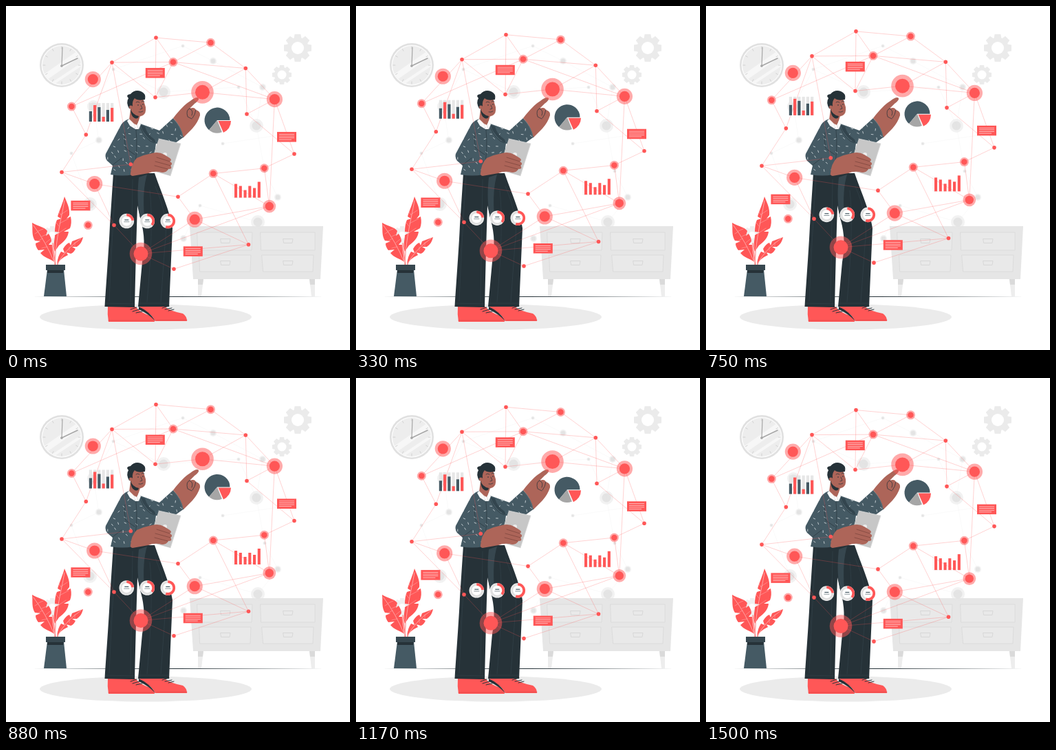
An HTML page with a canvas that plays this animation: 500 by 500 pixels, repeating every 1540 ms.

```html
<!DOCTYPE html>
<html lang="en">
<head>
<meta charset="utf-8">
<title>Data network</title>
<style>
html, body { margin: 0; width: 100%; height: 100%; overflow: hidden; background: #fff; }
canvas { display: block; width: 100vw; height: 100vh; }
</style>
</head>
<body>
<canvas id="stage" width="500" height="500"></canvas>
<script>
const RED = '#ff5757', DARK = '#263238', SLATE = '#455a64', SKIN = '#ad6559', PALE = '#ebebeb';
const TAU = Math.PI * 2, DEG = Math.PI / 180;
const LOOP = 1540, STEPS = 37;

const stage = document.getElementById('stage').getContext('2d');
const backdrop = document.createElement('canvas');
backdrop.width = backdrop.height = 500;
let ctx = backdrop.getContext('2d');

function fill(d, color) {
  ctx.fillStyle = color;
  ctx.fill(new Path2D(d));
}

function stroke(d, color, width = 0.6) {
  ctx.strokeStyle = color;
  ctx.lineWidth = width;
  ctx.stroke(new Path2D(d));
}

function disc(x, y, r, color, alpha = 1) {
  ctx.globalAlpha = alpha;
  ctx.fillStyle = color;
  ctx.beginPath();
  ctx.arc(x, y, r, 0, TAU);
  ctx.fill();
  ctx.globalAlpha = 1;
}

function rect(x, y, w, h, color) {
  ctx.fillStyle = color;
  ctx.fillRect(x, y, w, h);
}

function wedge(x, y, r, from, to, color) {
  ctx.fillStyle = color;
  ctx.beginPath();
  ctx.moveTo(x, y);
  ctx.arc(x, y, r, from * DEG, to * DEG);
  ctx.fill();
}

function gear(x, y, r, hole, color = PALE) {
  ctx.save();
  ctx.translate(x, y);
  disc(0, 0, r * 0.78, color);
  for (let i = 0; i < 8; i++) {
    ctx.rotate(TAU / 8);
    fill(`M${-r * .27} ${-r * .7}L${-r * .22} ${-r}H${r * .22}L${r * .27} ${-r * .7}Z`, color);
  }
  disc(0, 0, hole, '#fff');
  ctx.restore();
}

function drawClock() {
  disc(81, 86, 32, '#e0e0e0');
  disc(81, 86, 29.5, '#fafafa');
  disc(81, 86, 28, '#ededed');
  ctx.save();
  ctx.beginPath();
  ctx.arc(81, 86, 28, 0, TAU);
  ctx.clip();
  stroke('M52 107L108 68', '#f7f7f7', 9);
  stroke('M66 114L114 82', '#f7f7f7', 4);
  ctx.restore();
  for (let i = 0; i < 12; i++) {
    const c = Math.cos(i * TAU / 12), s = Math.sin(i * TAU / 12);
    stroke(`M${81 + c * 24} ${86 + s * 24}L${81 + c * 27} ${86 + s * 27}`, '#c9c9c9', 0.8);
  }
  stroke('M81 88L82 60', '#a6a6a6', 1.2);
  stroke('M80 87.5L104 76', '#a6a6a6', 1.5);
  disc(81, 87, 1.8, '#a6a6a6');
}

function drawCabinet() {
  fill('M279 397h8l-3 25h-5ZM441 397h8v25h-5Z', '#ededed');
  fill('M279 397h8l-1 8h-7ZM441 397h8v8h-7Z', '#dadada');
  fill('M267 320H461L457 397H272Z', '#e6e6e6');
  const drawers = 'M278 329H358L357 355H279ZM370 329H449V355H371ZM281 362H356L355 386H282ZM372 362H447L446 386H374Z';
  fill(drawers, '#e9e9e9');
  stroke(drawers, '#d9d9d9', 0.8);
  for (const x of [312, 403]) for (const y of [338.5, 370.5])
    stroke(`M${x} ${y}h14l-1 6h-12Z`, '#d3d3d3', 0.8);
}

function drawPlant() {
  gear(67, 333, 13, 5, '#f0f0f0');
  stroke('M68 345Q70 362 72 378M73 340Q72 360 71 378M90 357Q78 365 74 378', RED, 1);
  fill('M85 277C89 287 93 294 92 304L88 309L94 306Q96 316 93 323L84 328L91 328C90 337 84 343 77 348L71 357C68 346 71 340 71 333L78 329L71 328Q71 318 74 311L80 309L75 306C78 296 82 288 85 277Z', RED);
  fill('M38 315C46 320 56 321 60 327L58 334L62 331Q66 337 66 342L62 347L67 347L70 372C64 367 55 366 50 359L56 354L47 355Q43 350 43 345L50 342L42 341C37 333 39 325 38 315Z', RED);
  fill('M112 336C110 344 107 347 103 350L96 350L101 353Q98 359 94 360L88 358L90 362Q83 365 79 369L74 375C75 367 77 361 80 357L85 359L83 353Q87 346 92 344L94 348L96 342Q104 339 112 336Z', RED);
  stroke('M85 283C80 312 73 335 71 372M40 319Q58 343 70 372M109 338Q88 352 75 374', '#ffd5d5', 0.6);
  stroke('M80 303l9 -6M78 316l13 -7M75 331l12 -8M80 304l-3 -5M77 320l-4 -5M47 327l7 -3M52 335l9 -4M58 344l6 -5M47 328l-5 3M53 338l-7 4M60 350l-8 2M100 344v5M92 350v6M85 357l4 3', '#ffb3b3', 0.5);
  fill('M60 383H84L88 422H55Z', SLATE);
  fill('M60 383H84L83 388H60Z', DARK);
  fill('M58 376H86V384H58Z', '#37474f');
}

function drawLegs() {
  fill('M148 437H188Q197 447 210 450Q216 453 216 459H149Q147 448 148 437Z', RED);
  fill('M194 436H229Q240 444 257 447Q263 451 263 458H217Q211 446 195 440Z', RED);
  stroke('M149 457H216M219 456.5H263', '#d94646', 0.6);
  stroke('M181 441l9 -3M184 444l10 -3M189 446l9 -2M227 439l10 -3M231 441l10 -2M236 443l8 -2', DARK, 1);
  fill('M193 437Q209 444 217 458Q208 448 193 441Z', DARK);
  fill('M156 243H216C223 264 239 300 242 323L237 437H192L198 372Q204 340 196 312L191 290Q189 350 187 438L143.5 437C147 385 150 344 151 319Z', DARK);
  fill('M193 249L205 245Q198 267 201 306L196 312Q189 286 193 249Z', '#37474f');
  stroke('M160 248Q154 335 150 429M184 252L181 430M217 262Q237 308 231 347L225 430M209 268Q215 320 205 430', '#37474f', 0.5);
  stroke('M145 432L187 433M193 432H237', '#37474f', 0.5);
}

function drawShirt() {
  const shirt = 'M179 164Q169 167 165 177L147 211Q142 218 147 225L155 232L152 245Q169 248 185 245L213 237L218 200L236 205Q247 199 259 190Q255 175 243 163L223 181L195 171Z';
  fill(shirt, SLATE);
  ctx.save();
  ctx.clip(new Path2D(shirt));
  let seed = 17;
  const random = () => (seed = seed * 16807 % 2147483647) / 2147483647;
  for (let y = 166, row = 0; y < 248; y += 9, row++) for (let x = 144 + row % 2 * 6; x < 260; x += 12) {
    const px = x + random() * 4, py = y + random() * 4, a = random() * TAU;
    stroke(`M${px} ${py}l${Math.cos(a) * 2.8} ${Math.sin(a) * 2.8}`, '#dfe5e8', 0.8);
  }
  ctx.restore();
  stroke('M173 184Q171 196 174 207L187 216M155 231L168 221M196 178Q202 194 215 199M189 180Q192 210 186 241', DARK, 0.6);
  fill('M195 173Q203 192 218 200L216 194Q205 187 202 175Z', '#33454e');
}

function drawHead() {
  fill('M182 143L179 165L190 176L195 160Z', SKIN);
  fill('M182 136Q190 131 199 134L203 147Q204 156 199 159Q190 163 185 157Q178 151 182 136Z', SKIN);
  fill('M181 149Q183 158 193 160Q192 165 187 163Q181 160 181 149Z', DARK);
  fill('M179 149Q174 140 178 134Q173 129 181 128Q187 121 196 124Q204 127 202 136Q191 138 187 134Q183 139 184 145Q182 150 179 149Z', DARK);
  disc(181.5, 147, 2.5, SKIN);
  disc(192, 144, 0.8, DARK);
  disc(199, 143, 0.8, DARK);
  stroke('M189 140Q191 138 194 140M197 139Q199 137 201 139M196 144L198 149L195 150M193 154Q196 155 199 153', DARK, 0.7);
  fill('M179 164L186 171L188 179L180 174L176 167ZM190 173L193 167L196 172L193 179Z', '#fafafa');
  fill('M186 171L190 173L193 179L188 179Z', '#fff');
}

function drawHands() {
  fill('M243 163C253 150 261 142 268 138Q277 131 280 134Q281 137 274 142L267 149Q274 146 276 151Q283 153 282 159Q279 169 271 178L258 191Q255 175 243 163Z', SKIN);
  stroke('M267 149Q261 151 264 161L270 164M267 149Q273 152 270 159M276 151Q275 158 271 163', DARK, 0.7);
  stroke('M244 165Q255 176 257 191', '#6d8088', 0.6);
  fill('M222 193L254 200L239 247L207 238Z', '#c7c7c7');
  stroke('M222 193L254 200L239 247', '#dcdcdc', 0.8);
  disc(231, 216, 3, '#ededed');
  fill('M190 221Q201 216 212 214Q222 211 230 216L238 221Q242 224 238 226Q244 229 239 232Q243 237 236 237Q232 244 223 241Q213 240 207 243L184 247Q180 246 181 243Q182 229 190 221Z', SKIN);
  stroke('M219 220L238 226M217 226L239 232M216 232L235 237', '#6f3d36', 0.6);
}

const greyDots = [[257, 58, 2.5], [301, 80, 5], [338, 118, 2.5], [373, 118, 5], [229, 125, 10], [364, 174, 10],
  [315, 200, 2.5], [135, 195, 5], [127, 146, 9], [95, 214, 2.5], [156, 92, 2.5], [395, 278, 5],
  [376, 240, 2.5], [366, 314, 10], [282, 290, 2.5], [258, 338, 5], [122, 288, 10]];

function drawGreyNet() {
  stroke('M156 92L257 58L301 80L373 118L364 174L376 240L395 278L366 314L282 290L258 338M127 146L156 92L229 125L338 118L364 174M95 214L135 195L127 146M315 200L395 188M122 288L95 214', '#f5f5f5', 0.5);
  for (const [x, y, r] of greyDots) {
    disc(x, y, r, '#e6e6e6', 0.5);
    disc(x, y, r * 0.65, '#e0e0e0', 0.8);
  }
}

function drawBackdrop() {
  rect(0, 0, 500, 500, '#fff');
  ctx.lineCap = ctx.lineJoin = 'round';
  gear(424, 61, 20, 9);
  gear(401, 100, 14, 6.5);
  drawClock();
  drawCabinet();
  fill('M38 422.4L250 421.9L462 422.4L250 422.9Z', DARK);
  ctx.fillStyle = PALE;
  ctx.beginPath();
  ctx.ellipse(203, 452, 154, 18.5, 0, 0, TAU);
  ctx.fill();
  drawPlant();
  drawGreyNet();
  drawLegs();
  drawShirt();
  drawHead();
  drawHands();
}

// Each node: x, y, core radius.
const nodes = {
  A: [218, 46, 2.8], B: [297.5, 53.2, 4.3], C: [154, 82, 2.8], D: [243, 81.5, 4.3], E: [126.3, 106.5, 7.6], F: [348.3, 90.5, 2.8],
  G: [217, 132.7, 2.8], H: [285.5, 125.3, 10.5], I: [390.4, 135.6, 7.6], J: [95.3, 146, 4.3], K: [350, 157, 2.8], L: [116.3, 187, 2.8],
  M: [419, 215, 2.8], N: [181.3, 230, 2.8], O: [81, 241.5, 2.8], P: [301.3, 243.5, 4.3], Q: [375.4, 235.7, 4.3], R: [128.7, 258.5, 7.6],
  S: [250, 277.3, 2.8], T: [382.8, 291, 6.2], U: [274.3, 310.2, 7.6], V: [157, 318.5, 2.8], W: [119.3, 318.5, 4.3], X: [352.5, 346.7, 2.8],
  Y: [196, 360, 10.5], Z: [244, 382.3, 2.8]
};
const edges = 'AB AC AD AG BD BF CD CJ CL CG CN JD DF DG DI GH HF FK FI HI KI KM IM IT MQ QT QP PS PX PT SR SU UT UX UY YX YZ ZX YV YT VO OL JL ON OR RV'.split(' ');

function drawNode([x, y, r]) {
  if (r > 3) disc(x, y, r + (r > 10 ? 5.8 : r > 7 ? 4 : r > 6 ? 3.2 : 2.2), RED, 0.5);
  disc(x, y, r, RED);
}

function drawLabel(x, y) {
  rect(x, y, 28, 14.5, RED);
  for (let i = 0; i < 4; i++) rect(x + 3, y + 3 + i * 2.6, i === 3 ? 18 : 22, 0.8, '#ffd0d0');
}

function drawDonut(x, sweep) {
  const y = 312.5;
  disc(x, y, 10.8, '#f5f5f5');
  disc(x, y, 10, '#e0e0e0');
  wedge(x, y, 10.8, -90, sweep - 90, RED);
  disc(x, y, 7, '#fff');
  rect(x - 3, y - 2.2, 6, 1.2, SLATE);
  rect(x - 4, y + 0.6, 8, 1, '#8a969b');
}

function drawCharts() {
  [15, 24, 21, 7, 17, 20].forEach((h, i) => {
    const x = 120.8 + i * 6.25;
    rect(x, 141, 4.2, 27, '#e6e6e6');
    rect(x, 168 - h, 4.2, h, i % 2 ? RED : SLATE);
  });
  ctx.setLineDash([1, 1.5]);
  stroke('M330 257V278.5H371', '#d5d5d5', 0.5);
  ctx.setLineDash([]);
  [20, 17, 11, 17, 14, 23].forEach((h, i) => rect(332 + i * 6.75, 278.5 - h, 4.1, h, RED));
  wedge(307, 166, 18.5, 130, 360, SLATE);
  wedge(307, 166, 18.5, 68, 130, '#a6a6a6');
  wedge(308.5, 167, 18.5, 0, 66, RED);
  drawDonut(175.3, 85);
  drawDonut(205.3, 130);
  drawDonut(235.3, 200);
}

function drawNetwork() {
  ctx.globalAlpha = 0.6;
  for (const [a, b] of edges) {
    const [x1, y1] = nodes[a], [x2, y2] = nodes[b];
    stroke(`M${x1} ${y1}L${x2} ${y2}`, RED, 0.45);
  }
  ctx.globalAlpha = 1;
  Object.values(nodes).forEach(drawNode);
  drawLabel(202.8, 90);
  drawLabel(394, 183);
  drawLabel(94.4, 282.8);
  drawLabel(257.8, 349.3);
  drawCharts();
}

// Linear float up and down by 10px, peaking on the last step of the loop.
function floatOffset(step) {
  const phase = ((step + 1) % STEPS) / STEPS;
  return 0.6 - 10 * (1 - Math.abs(1 - 2 * phase));
}

function render(elapsed) {
  const step = Math.min(STEPS - 1, Math.floor((elapsed % LOOP + 4) * STEPS / LOOP));
  ctx.drawImage(backdrop, 0, 0);
  ctx.save();
  ctx.translate(0, floatOffset(step));
  drawNetwork();
  ctx.restore();
}

let start;
function tick(now) {
  start ??= now;
  render(now - start);
  requestAnimationFrame(tick);
}

drawBackdrop();
ctx = stage;
requestAnimationFrame(tick);
</script>
</body>
</html>
```
